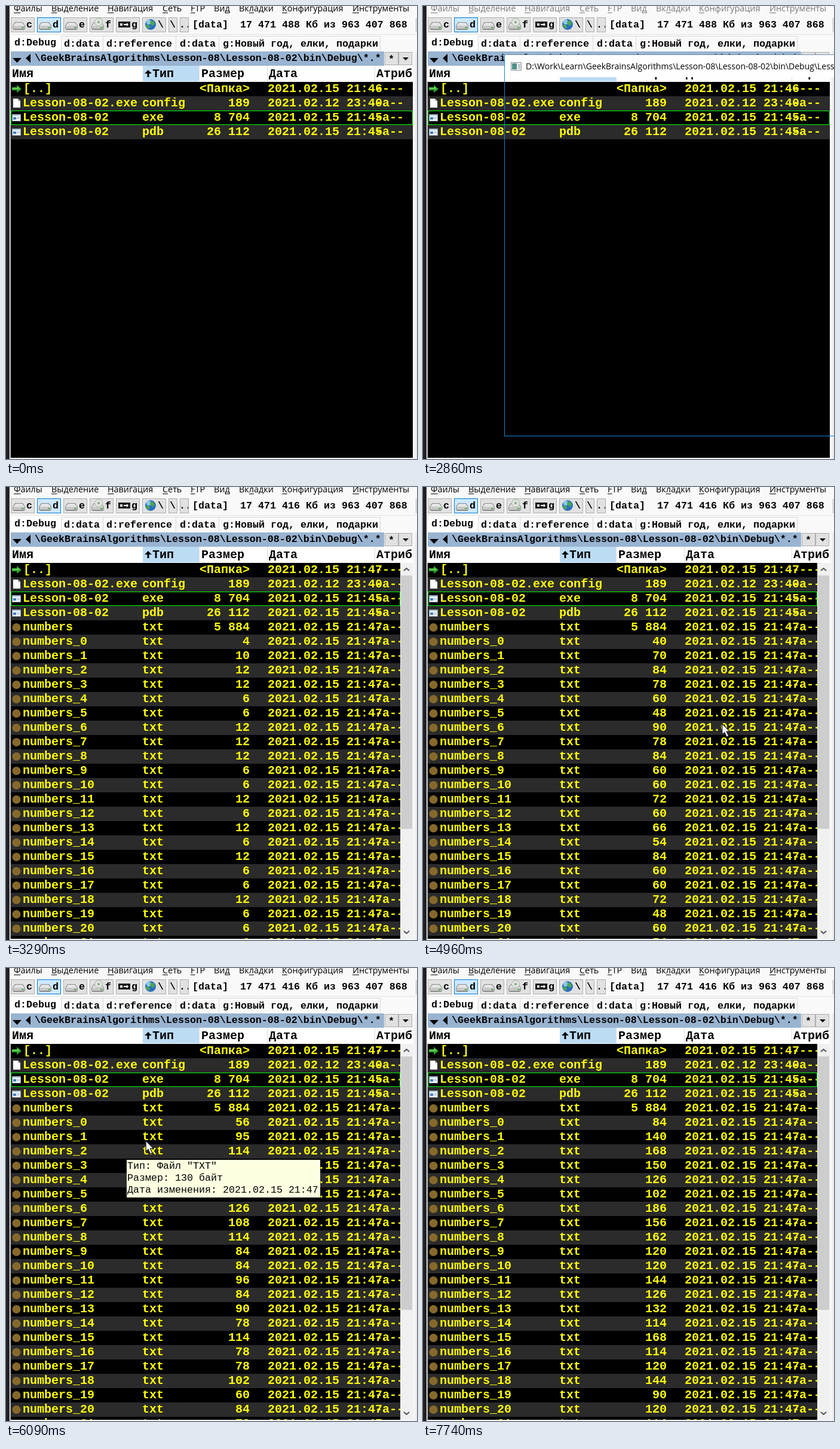
Recreate the animation shown at these times as an HTML page with a canvas. Size 688x758 px, loop 8 s.

```html
<!DOCTYPE html>
<html lang="ru">
<head>
<meta charset="utf-8">
<title>File panel</title>
<style>
html, body { margin: 0; width: 100%; height: 100%; overflow: hidden; background: #f0f0f0; }
canvas { display: block; }
</style>
</head>
<body>
<canvas id="stage" width="688" height="758"></canvas>
<script>
const ctx = document.getElementById('stage').getContext('2d');
const LOOP = 8000, ROW = 24, TOP = 127;
const MONO = '"Liberation Mono", "Courier New", monospace';
const SANS = '"Open Sans", "Noto Sans", sans-serif';
const YELLOW = '#ffff00';

const REFRESH = { start: 3415, every: 480, last: 9 };
// Key points of the pointer: time, x, y
const MOUSE = [
  [4910, 690, 440], [4960, 500, 396], [5260, 436, 150], [5700, 338, 300],
  [5850, 187, 303], [6090, 233, 288], [6550, 264, 330], [6735, 700, 400]
];

function box(x, y, w, h, fill) {
  ctx.fillStyle = fill;
  ctx.fillRect(x, y, w, h);
}

function frame(x, y, w, h, color) {
  ctx.strokeStyle = color;
  ctx.lineWidth = 1;
  ctx.strokeRect(x + 0.5, y + 0.5, w - 1, h - 1);
}

function poly(fill, ...pts) {
  ctx.beginPath();
  for (let i = 0; i < pts.length; i += 2) ctx.lineTo(pts[i], pts[i + 1]);
  ctx.closePath();
  ctx.fillStyle = fill;
  ctx.fill();
}

function disc(x, y, r, fill) {
  ctx.beginPath();
  ctx.arc(x, y, r, 0, Math.PI * 2);
  ctx.fillStyle = fill;
  ctx.fill();
}

// Monospaced text; step is the advance of one character
function mono(str, x, y, step, color = '#000', weight = 'bold', align = 'left') {
  ctx.font = `${weight} ${step / 0.6}px ${MONO}`;
  ctx.textAlign = align;
  ctx.fillStyle = color;
  ctx.fillText(str, x, y);
}

function sans(str, x, y, size, color) {
  ctx.font = `${size}px ${SANS}`;
  ctx.textAlign = 'left';
  ctx.fillStyle = color;
  ctx.fillText(str, x, y);
}

function clip(x, y, w, h, draw) {
  ctx.save();
  ctx.beginPath();
  ctx.rect(x, y, w, h);
  ctx.clip();
  draw();
  ctx.restore();
}

function menu(color) {
  const items = [
    ['Файлы', 13, 0], ['Выделение', 76, 0], ['Навигация', 170, 0], ['Сеть', 262, 0], ['FTP', 309, 0],
    ['Вид', 348, 2], ['Вкладки', 390, 2], ['Конфигурация', 462, 0], ['Инструменты', 580, 0]
  ];
  for (const [label, x, key] of items) {
    sans(label, x, 9, 14.4, color);
    const from = ctx.measureText(label.slice(0, key)).width;
    box(x + from, 11, ctx.measureText(label[key]).width, 1, color);
  }
}

function drive(x, y) {
  poly('#8d8d8d', x, y + 6, x + 4, y, x + 17, y, x + 21, y + 6, x + 21, y + 11, x + 19, y + 13, x + 2, y + 13, x, y + 11);
  poly('#e6e6e6', x + 1, y + 6, x + 5, y + 1, x + 16, y + 1, x + 20, y + 6);
  box(x + 1, y + 6, 19, 5, '#c8c8c8');
  box(x + 15, y + 8, 4, 2, '#4fb34f');
}

function toolbar(free) {
  const button = (x, w, on) => {
    box(x, 19, w, 25, on ? '#cce8ff' : '#e1e1e1');
    frame(x, 19, w, 25, on ? '#0078d7' : '#adadad');
  };
  ['c', 'd', 'e', 'f', 'g'].forEach((name, i) => {
    const x = 8 + i * 44;
    button(x, 40, name === 'd');
    if (name === 'g') {
      box(x + 4, 26, 20, 10, '#1c1c1c');
      box(x + 7, 29, 4, 4, '#ddd');
      poly('#fff', x + 13, 30, x + 18, 30, x + 18, 28, x + 21, 31, x + 18, 34, x + 18, 32, x + 13, 32);
    } else {
      drive(x + 3, 27);
      if (name === 'f') {
        disc(x + 15, 27, 7, '#aeb8ae');
        disc(x + 15, 27, 6, '#dfe6dc');
        disc(x + 15, 27, 2, '#8ba58b');
      }
    }
    mono(name, x + 26, 36, 10);
  });
  button(228, 40);
  disc(242, 31, 9, '#2a6fc4');
  disc(239, 27, 4, '#8cc8f0');
  poly('#4ca64c', 242, 24, 248, 26, 249, 31, 245, 33, 241, 29);
  poly('#4ca64c', 235, 31, 240, 32, 241, 36, 238, 38, 234, 34);
  mono('\\', 254, 36, 10);
  button(272, 15);
  mono('\\', 274, 36, 10);
  button(291, 15);
  clip(292, 20, 13, 23, () => mono('..', 290, 36, 10));
  mono(`[data]  17 471 ${free} Кб из 963 407 868`, 312, 36, 10);
  box(686, 20, 1, 24, '#adadad');
}

function tabs() {
  box(8, 50, 619, 26, '#f9f9f9');
  box(8, 50, 619, 1, '#d9d9d9');
  box(8, 48, 84, 28, '#ffffff');
  for (const x of [92, 162, 284, 356, 626]) box(x, 51, 1, 24, '#d9d9d9');
  const names = [['d:data', 97], ['d:reference', 168], ['d:data', 291], ['g:Новый год, елки, подарки', 363]];
  mono('d:Debug', 14, 66, 10);
  for (const [name, x] of names) mono(name, x, 68, 10);
}

function pathBar() {
  box(8, 76, 625, 24, '#99b4d1');
  poly('#000', 11, 87, 26, 87, 18.5, 95);
  poly('#000', 41, 80, 41, 95, 33, 87.5);
  mono('\\GeekBrainsAlgorithms\\Lesson-08\\Lesson-08-02\\bin\\Debug\\*.*', 48, 92, 10);
  for (const x of [634, 657]) {
    box(x, 77, 23, 22, '#e1e1e1');
    frame(x, 77, 23, 22, '#adadad');
  }
  mono('*', 640, 94, 10);
  poly('#000', 664, 86, 674, 86, 669, 91);
}

function header() {
  box(8, 100, 673, 27, '#ffffff');
  box(229, 100, 95, 26, '#bcdcf4');
  for (const x of [323, 437, 617]) box(x, 100, 1, 26, '#dcdcdc');
  poly('#000', 232, 113, 238, 107, 244, 113, 239.5, 113, 239.5, 119, 236.5, 119, 236.5, 113);
  const cols = [['Имя', 10], ['Тип', 245], ['Размер', 327], ['Дата', 440], ['Атриб', 620]];
  clip(8, 100, 673, 26, () => cols.forEach(([name, x]) => mono(name, x, 119, 12)));
}

function icon(kind, y) {
  if (kind === 'up') {
    poly('#2fa52f', 10, y + 9, 18, y + 9, 18, y + 5, 26, y + 12, 18, y + 18, 18, y + 14, 10, y + 14);
    poly('#7be05a', 11, y + 10, 19, y + 10, 19, y + 8, 23, y + 11.5, 11, y + 11.5);
  } else if (kind === 'page') {
    poly('#fff', 12, y + 4, 20, y + 4, 24, y + 8, 24, y + 19, 12, y + 19);
    poly('#b0b0b0', 20, y + 4, 24, y + 8, 20, y + 8);
  } else if (kind === 'app') {
    box(10, y + 6, 15, 12, '#8a9aa8');
    box(11, y + 7, 13, 10, '#f4f8fb');
    box(11, y + 7, 13, 2, '#b9d3ea');
    box(12, y + 11, 5, 4, '#3f7fc4');
    box(18, y + 11, 5, 1, '#9fb6c8');
    box(18, y + 13, 5, 1, '#9fb6c8');
  } else {
    disc(17.5, y + 12, 7, '#86692a');
  }
}

function random(seed) {
  const v = Math.sin(seed * 12.9898 + 4.1) * 43758.5453;
  return v - Math.floor(v);
}

// Every file gains whole lines at its own pace, quicker at first
function sizeOf(n, t) {
  const passed = Math.floor((t - REFRESH.start) / REFRESH.every);
  const step = Math.min(REFRESH.last, Math.max(0, passed));
  const lines = 15 + 16 * random(n + 1);
  const grown = 0.07 + 0.93 * (step / REFRESH.last) ** 0.7;
  const lineLength = Math.min(6, 4 + n);
  return Math.round(lines * grown) * lineLength;
}

function rowsAt(t, filled) {
  const day = '2021.02.15 21:', now = day + '47';
  const rows = [
    ['up', '[..]', '', '<Папка>', filled ? now : day + '46', '----'],
    ['page', 'Lesson-08-02.exe', 'config', '189', '2021.02.12 23:40'],
    ['app', 'Lesson-08-02', 'exe', '8 704', day + '45'],
    ['app', 'Lesson-08-02', 'pdb', '26 112', day + '45']
  ];
  if (filled) {
    rows.push(['text', 'numbers', 'txt', '5 884', now]);
    for (let n = 0; n < 22; n++) rows.push(['text', 'numbers_' + n, 'txt', sizeOf(n, t), now]);
  }
  return rows;
}

function list(t, filled) {
  const right = filled ? 660 : 681;
  const current = t >= 1030 && t < 1270 ? 1 : 2;
  box(8, TOP, 673, 629, '#000');
  clip(8, TOP, right - 8, 629, () => {
    rowsAt(t, filled).forEach(([kind, name, type, size, date, attr = '-a--'], i) => {
      const y = TOP + i * ROW, base = y + 17;
      if (i % 2) box(8, y, right - 8, ROW, '#2b2b2b');
      icon(kind, y);
      mono(name, kind === 'up' ? 29 : 28, base, 12, YELLOW);
      mono(type, 228, base, 12, YELLOW);
      mono(size, 408, base, 12, YELLOW, 'bold', 'right');
      mono(date, 438, base, 12, YELLOW);
      mono(attr, 618, base, 12, YELLOW);
    });
    frame(8, TOP + current * ROW, right - 8, ROW, '#00ff00');
  });
  if (filled) scrollbar();
}

function scrollbar() {
  box(660, TOP, 21, 629, '#f0f0f0');
  box(661, 148, 19, 424, '#cdcdcd');
  ctx.strokeStyle = '#505050';
  ctx.lineWidth = 2;
  for (const [y, d] of [[140, -4], [743, 4]]) {
    ctx.beginPath();
    ctx.moveTo(666, y);
    ctx.lineTo(670.5, y + d);
    ctx.lineTo(675, y);
    ctx.stroke();
  }
}

function consoleWindow(t) {
  if (t < 2860 || t >= 3250) return;
  ctx.save();
  if (t >= 3190) ctx.globalAlpha = t < 3220 ? 0.6 : 0.25;
  if (t >= 2890) box(137, 119, 551, 600, '#0c0c0c');
  box(137, 82, 551, 37, '#ffffff');
  box(136, 81, 552, 1, '#6f8fae');
  box(136, 81, 1, 639, '#1883d7');
  box(136, 719, 552, 1, '#1883d7');
  box(147, 94, 18, 14, '#8a9299');
  box(148, 95, 16, 12, '#eef1f2');
  box(149, 96, 8, 10, '#4f8f86');
  box(159, 97, 4, 8, '#c3c9cc');
  sans('D:\\Work\\Learn\\GeekBrainsAlgorithms\\Lesson-08\\Lesson-08-02\\bin\\Debug\\Lesson-08-02.exe', 172, 106, 14, '#000');
  ctx.restore();
}

function tooltip(t) {
  if (t < 6000 || t >= 6300) return;
  box(202, 321, 324, 63, '#ffffe1');
  ['Тип: Файл "TXT"', 'Размер: 130 байт', 'Дата изменения: 2021.02.15 21:47']
    .forEach((line, i) => mono(line, 203, 336 + i * 20, 10, '#000', 'normal'));
}

function pointer(t) {
  const i = MOUSE.findIndex(p => t < p[0]);
  if (i < 1) return;
  const [t0, x0, y0] = MOUSE[i - 1], [t1, x1, y1] = MOUSE[i];
  const k = (t - t0) / (t1 - t0);
  ctx.save();
  ctx.translate(x0 + (x1 - x0) * k, y0 + (y1 - y0) * k);
  poly('#f2f2f2', 1, 1, 1, 19, 5, 15.5, 8.5, 23, 12, 21.5, 8.5, 14, 14, 14);
  ctx.strokeStyle = '#15151c';
  ctx.lineWidth = 1.2;
  ctx.stroke();
  ctx.restore();
}

function draw() {
  const t = performance.now() % LOOP;
  const filled = t >= 3250;
  const inactive = t >= 2860 && t < 3220;
  box(0, 0, 688, 758, '#f9f9f9');
  box(0, 0, 6, 758, '#202024');
  box(5, 0, 1, 758, '#3c3c40');
  box(7, 126, 1, 631, '#a0a0a0');
  box(681, 76, 7, 682, '#f5f5f5');
  box(686, 76, 1, 682, '#e0e0e0');
  box(8, 47, 680, 1, '#e3e3e3');
  menu(inactive ? '#7a7a7a' : '#000');
  toolbar(filled ? '416' : '488');
  tabs();
  pathBar();
  header();
  list(t, filled);
  consoleWindow(t);
  tooltip(t);
  pointer(t);
  requestAnimationFrame(draw);
}
draw();
</script>
</body>
</html>
```
